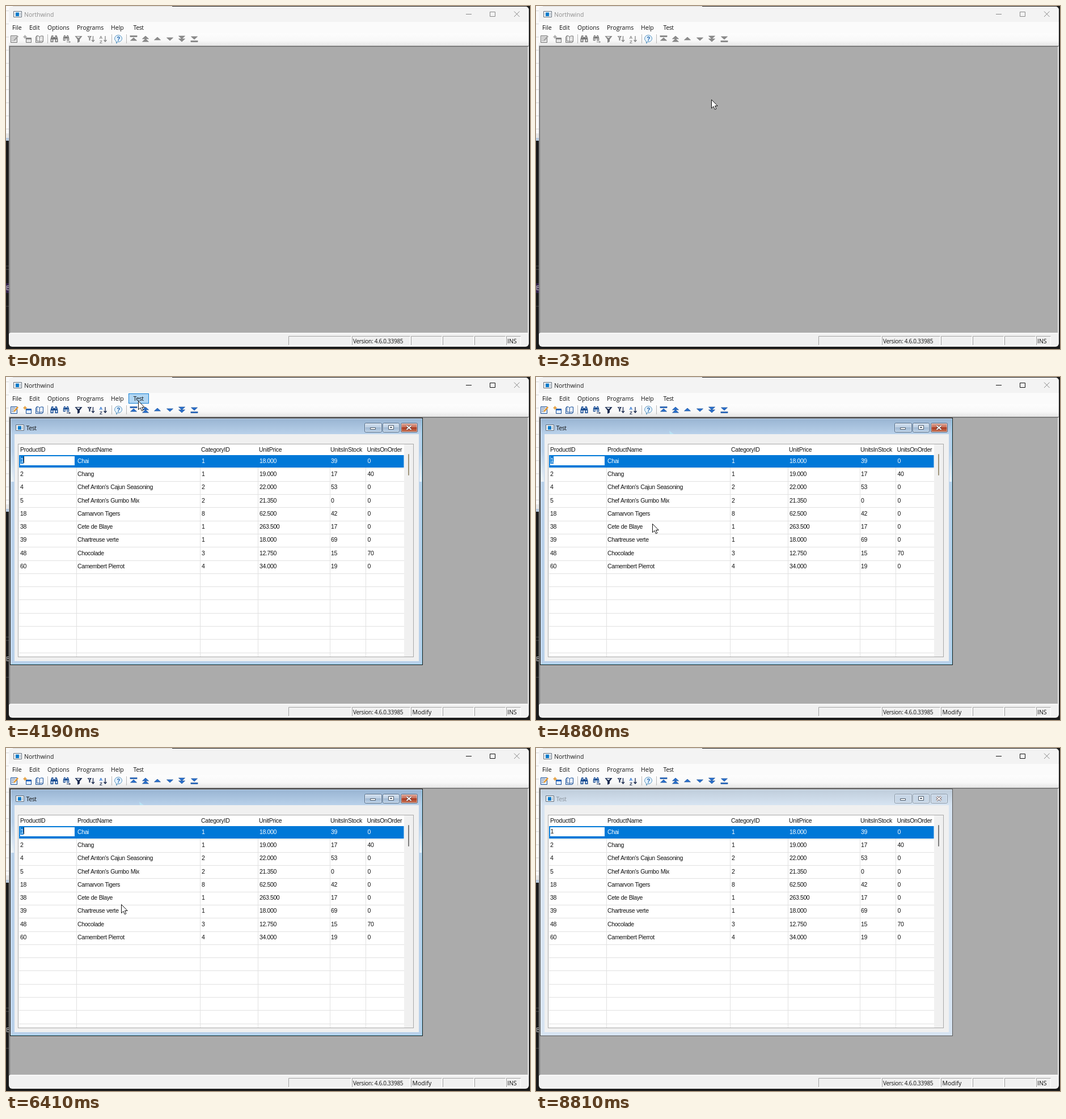
An HTML page that plays this animation: 924 px wide and 606 px high, repeating every 8.88 s.

```html
<!DOCTYPE html>
<html lang="en">
<head>
<meta charset="utf-8">
<title>Northwind</title>
<style>
  html, body { margin: 0; width: 100%; height: 100%; overflow: hidden; background: #1b1b1b; }
  svg { display: block; width: 924px; height: 606px; }
  text { white-space: pre; fill: #111; }
  .ui { font: 10.5px "Open Sans", "Noto Sans", sans-serif; }
  .grid { font: 10.5px "Liberation Sans", Arial, sans-serif; letter-spacing: -.38px; word-spacing: .5px; }
  .small { font-size: 10px; letter-spacing: -.28px; }
  .sel text, text.on { fill: #fff; }
  #tools { --ink: #868686; --blue: #8c8c8c; --pale: #e4e4e4; --gold: #a5a5a5; --edge: #777; }
  #tools.live { --ink: #1c2c50; --blue: #2870cf; --pale: #e6f1ff; --gold: #e49a35; --edge: #174b91; }
  .ink { fill: var(--ink); } .blue { fill: var(--blue); } .gold { fill: var(--gold); }
  .edge { fill: var(--edge); } .pale { fill: var(--pale); }
  .line { fill: none; stroke: var(--ink); }
  .page { fill: var(--pale); stroke: var(--edge); }
  .arrow { fill: var(--blue); stroke: var(--edge); stroke-width: .7; }
</style>
</head>
<body>
<svg viewBox="0 0 924 606" xmlns="http://www.w3.org/2000/svg">
  <defs>
    <linearGradient id="bar" x2="0" y2="1"><stop stop-color="#fdfdfd"/><stop offset=".6" stop-color="#f8f8f8"/><stop offset="1" stop-color="#e6e6e6"/></linearGradient>
    <linearGradient id="cap" x2="0" y2="1"><stop stop-color="#98b4d2"/><stop offset="1" stop-color="#b9d1ea"/></linearGradient>
    <linearGradient id="capOff" x2="0" y2="1"><stop stop-color="#bfcddb"/><stop offset="1" stop-color="#d7e4f2"/></linearGradient>
    <linearGradient id="btn" x2="0" y2="1"><stop stop-color="#d3e1f0"/><stop offset=".45" stop-color="#bed0e4"/><stop offset=".5" stop-color="#a2bad4"/><stop offset="1" stop-color="#bdd3ea"/></linearGradient>
    <linearGradient id="red" x2="0" y2="1"><stop stop-color="#dfa798"/><stop offset=".45" stop-color="#c8705a"/><stop offset=".5" stop-color="#a93a22"/><stop offset="1" stop-color="#cc7858"/></linearGradient>
    <linearGradient id="shine" x2="0" y2="1"><stop stop-color="#fff" stop-opacity="0"/><stop offset="1" stop-color="#fff" stop-opacity=".75"/></linearGradient>
    <g id="app"><path d="M.5.5h14v10H.5z" fill="#fff" stroke="#5f6b78"/><path d="M4 2.500h6v6.500H4z" fill="#0879c9"/><path d="M2 3h1v1H2zm0 2h1v1H2zm0 2h1v1H2zM11 3h2v1h-2zm0 2h2v1h-2zm0 2h2v1h-2z" fill="#8098ad"/></g>
  </defs>
  <g id="back"></g>
  <g id="frame"></g>
  <g id="tools"></g>
  <g id="child"></g>
  <g id="status"></g>
  <path id="cursor" d="M.5.5v15.2l3.5-3.3 2.4 5.4 2.5-1.1-2.4-5.2h4.7z" fill="#fff" stroke="#111"/>
</svg>
<script>
const LOOP = 8880, STEP = 70;
const $ = id => document.getElementById(id);
const rect = (x, y, w, h, fill, more = "") => `<rect x="${x}" y="${y}" width="${w}" height="${h}" fill="${fill}" ${more}/>`;
const path = (d, more) => `<path d="${d}" ${more}/>`;
const text = (x, y, s, cls = "ui", more = "") => `<text x="${x}" y="${y}" class="${cls}" ${more}>${s}</text>`;
const range = (n, fn) => Array.from({ length: n }, (_, i) => fn(i)).join("");
const show = (el, on) => { el.style.display = on ? "" : "none"; };

// Desktop behind the window
$("back").innerHTML =
  rect(0, 0, 924, 606, "#1b1b1b") + rect(0, 0, 293, 1, "#d8d8d8") + rect(0, 0, 12, 226, "#fafafa") +
  range(10, i => rect(0, 8 + i * 23.2, 6, 1, "#d8d8d8")) +
  rect(0, 225, 6, 8, "#e8e8e8") + rect(0, 233, 6, 5, "#b9cbe0") +
  rect(0, 459, 6, 1, "#444") + rect(0, 465, 6, 1, "#444") + rect(0, 530, 6, 1, "#444") +
  rect(0, 490, 6, 17, "#33244a", 'id="tab"') + text(0, 502, "B", "ui", 'style="fill:#ddd"');

// Main window
const menus = [[11, "File"], [41, "Edit"], [73, "Options"], [125, "Programs"], [185, "Help"]];
const cells = [[498, 110], [610, 102], [714, 54], [770, 54], [826, 54], [882, 25]];
$("frame").innerHTML =
  rect(5, 1, 917, 601, "#f0f0f0", 'rx="6"') + rect(5, 1, 917, 27, "#f3f3f3", 'rx="6"') +
  rect(5, 28, 917, 20, "#fbfbfb") + rect(5, 48, 917, 22, "url(#bar)") +
  rect(5, 70, 917, 509, "#a0a0a0") + rect(6, 71, 916, 508, "#fff") +
  rect(6, 71, 915, 507, "#696969") + rect(7, 72, 914, 506, "#e3e3e3") + rect(7, 72, 913, 505, "#ababab") +
  '<use href="#app" x="13" y="9"/>' + text(32, 18.5, "Northwind", "ui", 'id="title"') +
  path("M811 14.5h10M853.5 10.5h9v8h-9z", 'id="winBtns" fill="none" stroke="#888"') +
  path("M896 9.5l9.5 9.5M905.5 9.5l-9.5 9.5", 'id="winClose" fill="none" stroke="#888"') +
  rect(216.5, 29.5, 35, 17, "#b0d6f3", 'id="hover" stroke="#1680d4"') +
  menus.map(([x, s]) => text(x, 42, s)).join("") + text(224.5, 42, "Test", "ui", 'style="letter-spacing:-.4px"');

$("status").innerHTML =
  cells.map(([x, w]) => path(`M${x}.5 599V583.5h${w}`, 'fill="none" stroke="#a3a3a3"') +
    path(`M${x + w}.5 584v15.5h-${w}`, 'fill="none" stroke="#fff"')).join("") +
  text(612, 595.5, "Version: 4.6.0.33985", "ui small") + text(716.5, 595.5, "", "ui", 'id="mode"') +
  text(884, 595.5, "INS");

// Toolbar
const at = (x, s) => `<g transform="translate(${x} 58)">${s}</g>`;
const tri = (y, d) => path(`M-5.5 ${y + 2 * d}h11L0 ${y - 3 * d}z`, 'class="arrow"');
const edge = y => rect(-6, y, 12, 2, "", 'class="arrow"');
const glasses = path("M-4.500-6h3v3h3v-3h3L6.500 0v6H1.500V1h-3v5h-5V0z", 'class="edge"') +
  path("M-5 1h2v3.500h-2zM3 1h2v3.500H3zM-3.500-4.500h1v3h-1zM2.500-4.500h1v3h-1z", 'class="pale"');
const down = x => path(`M${x}-5v10m-2.5-3l2.5 3 2.5-3`, 'class="line" stroke-width="1.3"');
const icons = [
  [15, path("M-6.5-5.5h11v12h-11z", 'class="page"') + path("M-5-3h6M-5 0h4M-5 3h3", 'class="line" stroke-width=".7"') + path("M-2 4l1-3 6-7 2 2-6 7z", 'class="gold"')],
  [38, path("M-2.5-1.5h9v8h-9z", 'class="page"') + rect(-2, -1, 8, 2, "", 'class="blue"') + path("M-7.500-4.500h2v-2h2v2h2v2h-2v2h-2v-2h-2z", 'class="gold"')],
  [59, path("M-6.5-3.500L-4.500-5.500Q-1-6 0-3.500 2-6 6.500-5v9.500L5 6.500H-6.500zM0-3.500V5M-4.500-5.500V4Q-1 3.500 0 5 2 3 6.500 4.500", 'class="page"')],
  [85, glasses],
  [107, `<g transform="translate(-1 -1.500) scale(.8)">${glasses}</g>` + path("M0 5.500h6M4.500 4l2 1.500-2 1.500", 'class="line"')],
  [128, path("M-6.5-5h13L2 1v4l-4 2V1z", 'class="ink"') + path("M-4-4h7l-3 3z", 'class="pale"')],
  [150, path("M-6.5-5H1l-2.500 4v4h-2v-4z", 'class="ink"') + path("M-4.500-4h3L-3-2z", 'class="pale"') + down(3.5)],
  [171, text(-6.5, 0, "A", "", 'style="font:bold 8px sans-serif;fill:var(--blue)"') + text(-6, 7.5, "Z", "", 'style="font:bold 8px sans-serif;fill:var(--ink)"') + down(4)],
  [225, edge(-5.5) + tri(1, 1)],
  [246, tri(-2, 1) + tri(3, 1)],
  [267, tri(0, 1)],
  [289, tri(0, -1)],
  [310, tri(-3, -1) + tri(2, -1)],
  [332, tri(-2, -1) + edge(3.5)]
];
$("tools").innerHTML = icons.map(([x, s]) => at(x, s)).join("") +
  [73, 186, 212].map(x => rect(x, 50, 1, 16, "#b8b8b8")).join("") +
  at(198, path("M0-6.500a6.500 6 0 1 1-2 11.700l-1 3-1-4A6.500 6 0 0 1 0-6.500z", 'fill="#e9f5ff" stroke="#5791bd"') +
    text(-2.800, 3.500, "?", "", 'style="font:bold 10px sans-serif;fill:#145da8"'));

// Child window with the product table
const cols = [25, 126, 345, 447, 573, 637.5];
const heads = ["ProductID", "ProductName", "CategoryID", "UnitPrice", "UnitsInStock", "UnitsOnOrder"];
const products = [
  [1, "Chai", 1, "18.000", 39, 0],
  [2, "Chang", 1, "19.000", 17, 40],
  [4, "Chef Anton's Cajun Seasoning", 2, "22.000", 53, 0],
  [5, "Chef Anton's Gumbo Mix", 2, "21.350", 0, 0],
  [18, "Carnarvon Tigers", 8, "62.500", 42, 0],
  [38, "Cete de Blaye", 1, "263.500", 17, 0],
  [39, "Chartreuse verte", 1, "18.000", 69, 0],
  [48, "Chocolade", 3, "12.750", 15, 70],
  [60, "Camembert Pierrot", 4, "34.000", 19, 0],
  ["", "", 0, "0.000", 0, 0]
];
const rowTop = i => Math.round(138.3 + 23.28 * i);
const rowCells = (p, i) => p.map((s, c) => text(cols[c], Math.round(151.8 + 23.25 * i), s, "grid")).join("");
const button = (x, w, fill, id) => rect(x + .5, 81.5, w, 16, fill, `rx="2" stroke="#536b85" id="${id}"`) +
  rect(x + 1.5, 82.5, w - 2, 14, "none", 'rx="1" stroke="#fff" stroke-opacity=".45"');

$("child").innerHTML =
  rect(7.5, 72.5, 727, 436, "#b9d1ea", 'id="rim" stroke="#1a1a1a"') +
  rect(8, 73, 726, 28, "url(#cap)", 'id="caption"') +
  path("M8.5 507V73.500H733", 'fill="none" stroke="#fff" stroke-opacity=".5"') +
  path("M733.5 74V507.500H9", 'id="glow" fill="none" stroke="#8fd6f3"') +
  `<g id="shines">${rect(9, 130, 5, 55, "url(#shine)")}${rect(729, 130, 4, 55, "url(#shine)")}</g>` +
  '<use href="#app" x="17" y="84"/>' + text(35.5, 94, "Test", "ui", 'id="name" style="letter-spacing:-.4px"') +
  button(632, 30, "url(#btn)", "b1") + button(664, 29, "url(#btn)", "b2") + button(696, 29, "url(#red)", "b3") +
  path("M642.5 89.500h9v3h-9zM674.5 85.500h9v7h-9zM677.500 88.500h3v1h-3z", 'fill="#fff" stroke="#4a5868"') +
  path("M706.5 86l8 7M714.500 86l-8 7", 'fill="none" stroke="#5b4040" stroke-width="3.500"') +
  path("M706.5 86l8 7M714.500 86l-8 7", 'fill="none" stroke="#fff" stroke-width="1.800"') +
  rect(15, 101, 713, 401, "#ababab", 'id="client"') +
  path("M235 95l8 6h-7z", 'id="glint" fill="#b8e2f4"') +
  `<g id="table">` + rect(21.5, 118.5, 697, 376, "#fff", 'stroke="#a8a8a8"') + rect(702, 119, 16, 375, "#f0f0f0") +
  heads.map((s, c) => text(cols[c] - (c > 1 ? 1 : 0), 132, s, "grid", 'style="letter-spacing:-.25px"')).join("") +
  range(15, i => rect(23, rowTop(i + 1) - 1, 679, 1, "#e1e1e1")) +
  [124, 342, 444, 571, 634].map(x => rect(x, 138, 1, 356, "#e1e1e1")).join("") + "</g>" +
  `<g id="data">` + products.slice(0, 9).map(rowCells).join("") +
  rect(709, 137, 2, 34, "#f7f5eb", 'id="ghost"') + rect(709, 136, 2, 38, "#8b8378", 'id="thumb" rx="1"') +
  `</g><g id="pick"></g>`;

function pick(row, focused) {
  const y = rowTop(row), [id, ...rest] = products[row];
  const w = String(id).length * 5.500;
  $("pick").innerHTML = `<g class="sel">${rect(23, y, 678.5, 22, "#0078d7")}${rowCells(["", ...rest], row)}</g>` +
    rect(25, y + 2, 96, 16, "#fff") +
    (focused && id ? rect(25.500, y + 2, w, 13, "#0078d7") : "") +
    text(25.500, y + 12.500, id, focused ? "grid on" : "grid") +
    rect(25 + Math.ceil(w), y + 2, 1, 12, "#111", 'id="caret"');
}

// Cursor moves: start, end, from, to, easing bias
const moves = [
  [320, 460, [875, 615], [828, 554], 1],
  [990, 1620, [828, 554], [377, 274], .7],
  [2090, 2720, [377, 274], [233, 42], .8],
  [4340, 4950, [233, 42], [203, 276], .8],
  [6690, 7390, [203, 276], [440, 363], 1],
  [7720, 8540, [440, 363], [896, 612], .9]
];
function cursorAt(t) {
  const m = moves.filter(m => t >= m[0]).pop();
  if (!m) return [-50, -50];
  const [start, end, from, to, bias] = m;
  const n = Math.round((end - start) / STEP) + 1;
  const u = Math.min(1, (Math.floor((t - start) / STEP) + 1) / n) ** bias;
  const k = u * u * (3 - 2 * u);
  return from.map((a, i) => Math.round(a + (to[i] - a) * k));
}

// Selected row over time; row 9 is the new record
const picks = [[3200, 0], [4950, 9], [5350, 6], [5550, 9], [6210, 6], [6410, 0]];
const carets = [3200, 3670, 4190, 4720, 4950, 7200, 7720, 8240];
let lastPick = "";

function draw(t) {
  const active = (t >= 70 && t < 120) || t >= 2920;
  const ready = t >= 3200, blur = t >= 8810;
  const [x, y] = cursorAt(t);
  $("cursor").setAttribute("transform", `translate(${x} ${y})`);
  show($("hover"), x >= 216 && x < 252 && y >= 29 && y < 47);
  show($("tab"), t < 2920);

  $("title").style.fill = active ? "#1b1b1b" : "#8d8d8d";
  $("winBtns").style.stroke = active ? "#111" : "#888";
  $("winClose").style.stroke = active && !ready ? "#111" : "#888";
  $("tools").classList.toggle("live", ready);

  show($("child"), t >= 2990);
  show($("table"), t >= 3130);
  show($("data"), ready);
  show($("pick"), ready);
  show($("glint"), t >= 4340 && !blur);
  show($("shines"), !blur);
  show($("glow"), !blur);
  $("client").style.fill = t >= 3130 ? "#f0f0f0" : "#ababab";
  $("rim").style.fill = blur ? "#d7e4f2" : "#b9d1ea";
  $("rim").style.stroke = blur ? "#5a5a5a" : "#1a1a1a";
  $("caption").style.fill = blur ? "url(#capOff)" : "url(#cap)";
  $("name").style.fill = blur ? "#8a939c" : "#111";
  for (const id of ["b1", "b2", "b3"]) {
    $(id).style.fill = blur ? "#c8d7e7" : id === "b3" ? "url(#red)" : "url(#btn)";
    $(id).style.stroke = blur ? "#8796a6" : "#536b85";
  }

  $("mode").textContent = "";
  if (!ready) return;
  const row = picks.filter(p => t >= p[0]).pop()[1];
  $("mode").textContent = row === 9 ? "Create" : "Modify";
  $("thumb").setAttribute("y", row === 9 ? 447 : 136 + row * 38.8);
  $("thumb").setAttribute("height", row === 9 ? 31 : 38);
  $("thumb").style.fill = t < 6410 ? "#a0957c" : "#7e7e7e";
  show($("ghost"), row > 0);
  const key = row + "," + blur;
  if (key !== lastPick) pick(row, !blur);
  lastPick = key;
  show($("caret"), !blur && carets.filter(c => t >= c).length % 2 === 1);
}

const begin = performance.now();
(function tick() {
  draw((performance.now() - begin) % LOOP);
  requestAnimationFrame(tick);
})();
</script>
</body>
</html>
```
